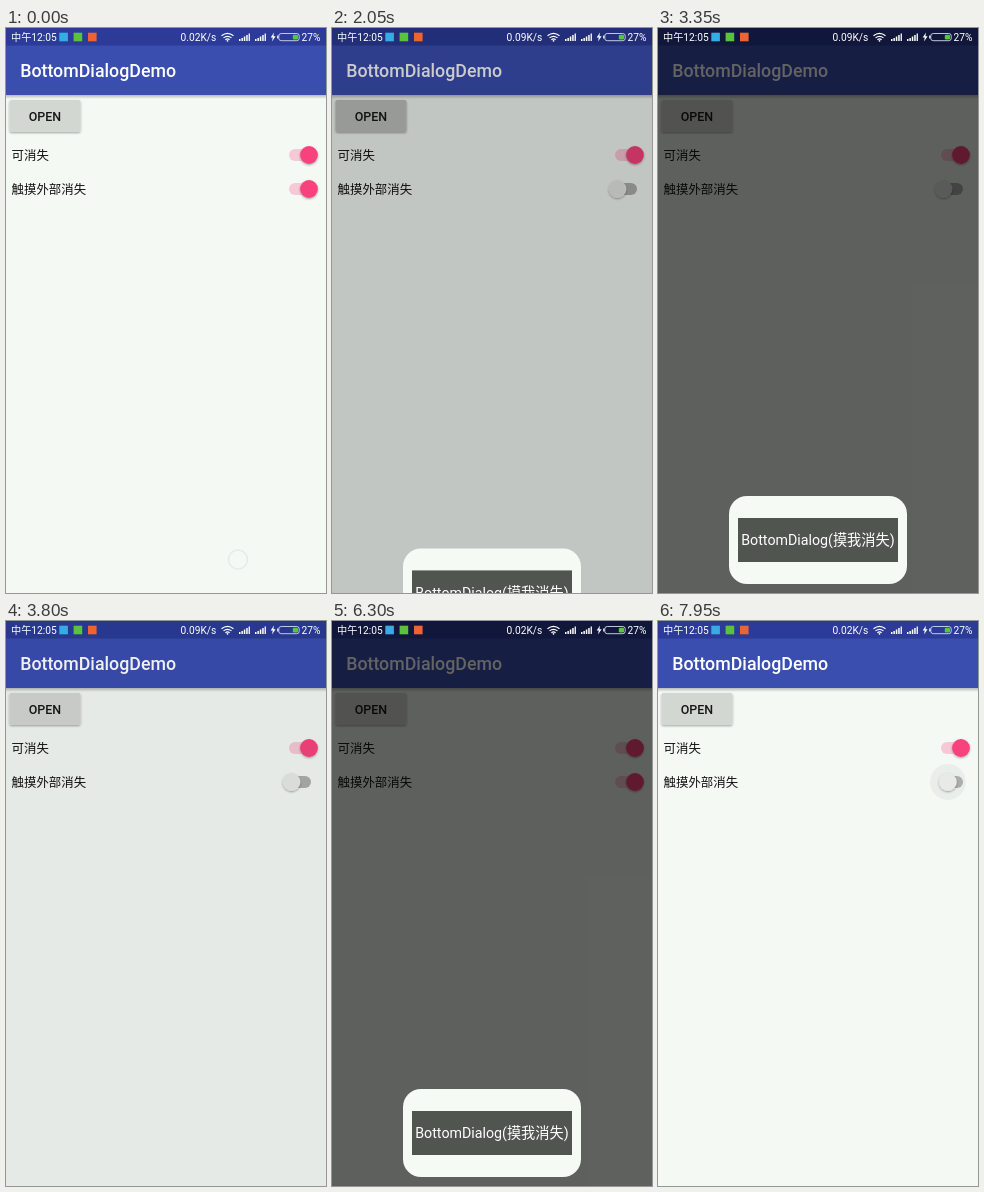
Write an HTML page that moves like this. It is 320 px wide and 565 px high and loops after 8 s.

```html
<!DOCTYPE html>
<html lang="zh">
<head>
<meta charset="utf-8">
<title>BottomDialogDemo</title>
<style>
  html, body { margin: 0; width: 100%; height: 100%; overflow: hidden; background: #f4f9f4; }
  svg { display: block; width: 100vw; height: 100vh; font-family: Roboto, "Noto Sans CJK SC", "Noto Sans CJK", sans-serif; }
</style>
</head>
<body>
<svg viewBox="0 0 320 565">
  <defs>
    <linearGradient id="shade" x2="0" y2="1">
      <stop stop-color="#000" stop-opacity=".25"/>
      <stop offset="1" stop-color="#000" stop-opacity="0"/>
    </linearGradient>
    <filter id="lift" x="-30%" y="-30%" width="160%" height="170%">
      <feDropShadow dx="0" dy="1" stdDeviation="1" flood-opacity=".35"/>
    </filter>
    <g id="signal">
      <path d="M0 13v-2h1.5v2zM2.4 13v-3h1.5v3zM4.8 13v-4.5h1.5v4.5zM7.2 13v-6h1.5v6zM9.6 13v-7.5h1.3v7.5z"/>
    </g>
  </defs>

  <rect width="320" height="565" fill="#f4f9f4"/>
  <rect y="67" width="320" height="4" fill="url(#shade)"/>
  <rect y="17" width="320" height="50" fill="#3a4eb0"/>
  <rect width="320" height="17.5" fill="#2b3b97"/>
  <text x="14.2" y="49.3" font-size="17.8" font-weight="500" fill="#fff">BottomDialogDemo</text>

  <rect id="button" x="3.5" y="72" width="71" height="32" rx="1.8" filter="url(#lift)"/>
  <text x="39" y="93" font-size="12.44" font-weight="500" text-anchor="middle" fill="#151715">OPEN</text>
  <g font-size="12.44" fill="#111">
    <text x="5.5" y="131.7">可消失</text>
    <text x="5.5" y="165.8">触摸外部消失</text>
  </g>
  <g>
    <rect x="283" y="121" width="22" height="12" rx="6" fill="#f7c8d6"/>
    <circle cx="303" cy="127" r="8.9" fill="#f7427d" filter="url(#lift)"/>
  </g>
  <g>
    <circle id="ripple" cy="161" r="18"/>
    <rect id="track" x="283" y="155" width="22" height="12" rx="6"/>
    <circle id="thumb" cy="161" r="8.9" filter="url(#lift)"/>
  </g>
  <circle id="touch" cx="232" cy="531.5" r="9.5" fill="none" stroke="#e7ebe7" stroke-width="1.6"/>

  <rect id="dim" width="320" height="565"/>

  <g fill="#fff" font-size="10.2">
    <text x="5" y="13">中午12:05</text>
    <rect x="53.3" y="4.7" width="8.6" height="8.6" fill="#35ade4"/>
    <rect x="67.6" y="4.7" width="8.6" height="8.6" fill="#5ac23c"/>
    <rect x="82" y="4.7" width="8.6" height="8.6" fill="#ee6430"/>
    <text id="speed" x="210.3" y="13" text-anchor="end"></text>
    <path d="M215.5 7.8q6-4.8 12 0M217.5 9.9q4-3.2 8 0M219.4 11.7q2.1-1.6 4.2 0" fill="none" stroke="#fff" stroke-width="1.2"/>
    <circle cx="221.5" cy="12.8" r=".9"/>
    <use href="#signal" x="233"/>
    <use href="#signal" x="249"/>
    <path d="M268 4.5l-3.3 5h2.1l-.8 4 3.6-5.3h-2.2z"/>
    <rect x="272.8" y="5.5" width="20.4" height="7.2" rx="2.4" fill="none" stroke="#d5d9ea" stroke-width=".9"/>
    <rect x="271.2" y="7.5" width="1.2" height="3"/>
    <rect x="286.8" y="6.7" width="5.2" height="4.8" rx="1.3" fill="#55c93a"/>
    <text x="295.6" y="13">27%</text>
  </g>

  <g id="dialog">
    <rect x="71" y="468" width="178" height="88" rx="18" fill="#f5faf5"/>
    <rect x="80" y="490" width="160" height="44" fill="#505550"/>
    <text x="160" y="517.3" font-size="14.22" text-anchor="middle" fill="#fff">BottomDialog(摸我消失)</text>
  </g>
</svg>
<script>
const LOOP = 8000;
const el = id => document.getElementById(id);
const [button, ripple, track, thumb, touch, dim, speed, dialog] =
  ["button", "ripple", "track", "thumb", "touch", "dim", "speed", "dialog"].map(el);
const set = (node, attrs) => { for (const k in attrs) node.setAttribute(k, attrs[k]); };

const ramp = (t, start, length) => Math.min(1, Math.max(0, (t - start) / length));
const pulse = (t, [start, end]) => ramp(t, start, 80) * (1 - ramp(t, end, 120));
const mix = (a, b, p) => `rgb(${a.map((v, i) => Math.round(v + (b[i] - v) * p))})`;

const presses = [[1720, 2060], [5430, 5930]];
const dialogs = [{ open: 1950, close: 3530 }, { open: 5850, close: 6750 }];
const toggles = [{ at: 600, on: 0 }, { at: 4700, on: 1 }, { at: 7800, on: 0 }];

function draw(t) {
  const pressed = Math.max(...presses.map(p => pulse(t, p)));
  set(button, { fill: mix([211, 215, 210], [189, 193, 188], pressed) });

  // Position and colour of the lower switch
  let on = 1, checked = 1, glow = 0;
  for (const s of toggles) {
    if (t >= s.at) {
      const p = ramp(t, s.at, 250);
      on += (s.on - on) * (1 - (1 - p) ** 1.5);
      checked += (s.on - checked) * ramp(t, s.at, 100);
    }
    glow = Math.max(glow, pulse(t, [s.at - 80, s.at + 170]));
  }
  const x = 285.5 + 17.5 * on;
  set(thumb, { cx: x, fill: mix([231, 234, 230], [247, 66, 125], checked) });
  set(track, { fill: mix([171, 174, 170], [247, 200, 214], checked) });
  set(ripple, { cx: x, "fill-opacity": 0.045 * glow });

  let shade = 0, drop = 97;
  for (const { open, close } of dialogs) {
    shade = Math.max(shade, ramp(t, open, 300) - ramp(t, close, 300));
    if (t >= open && t < close + 220) {
      const entering = (1 - ramp(t, open, 300)) ** 1.5;
      const leaving = ramp(t, close, 220) ** 1.5;
      drop = 97 * Math.max(entering, leaving);
    }
  }
  set(dim, { "fill-opacity": 0.61 * shade });
  set(dialog, { transform: `translate(0 ${drop})` });

  set(touch, { opacity: t < 1950 ? 1 : 0 });
  speed.textContent = t >= 1000 && t < 4700 ? "0.09K/s" : "0.02K/s";
}

const begin = performance.now();
function tick() {
  draw((performance.now() - begin) % LOOP);
  requestAnimationFrame(tick);
}
tick();
</script>
</body>
</html>
```
